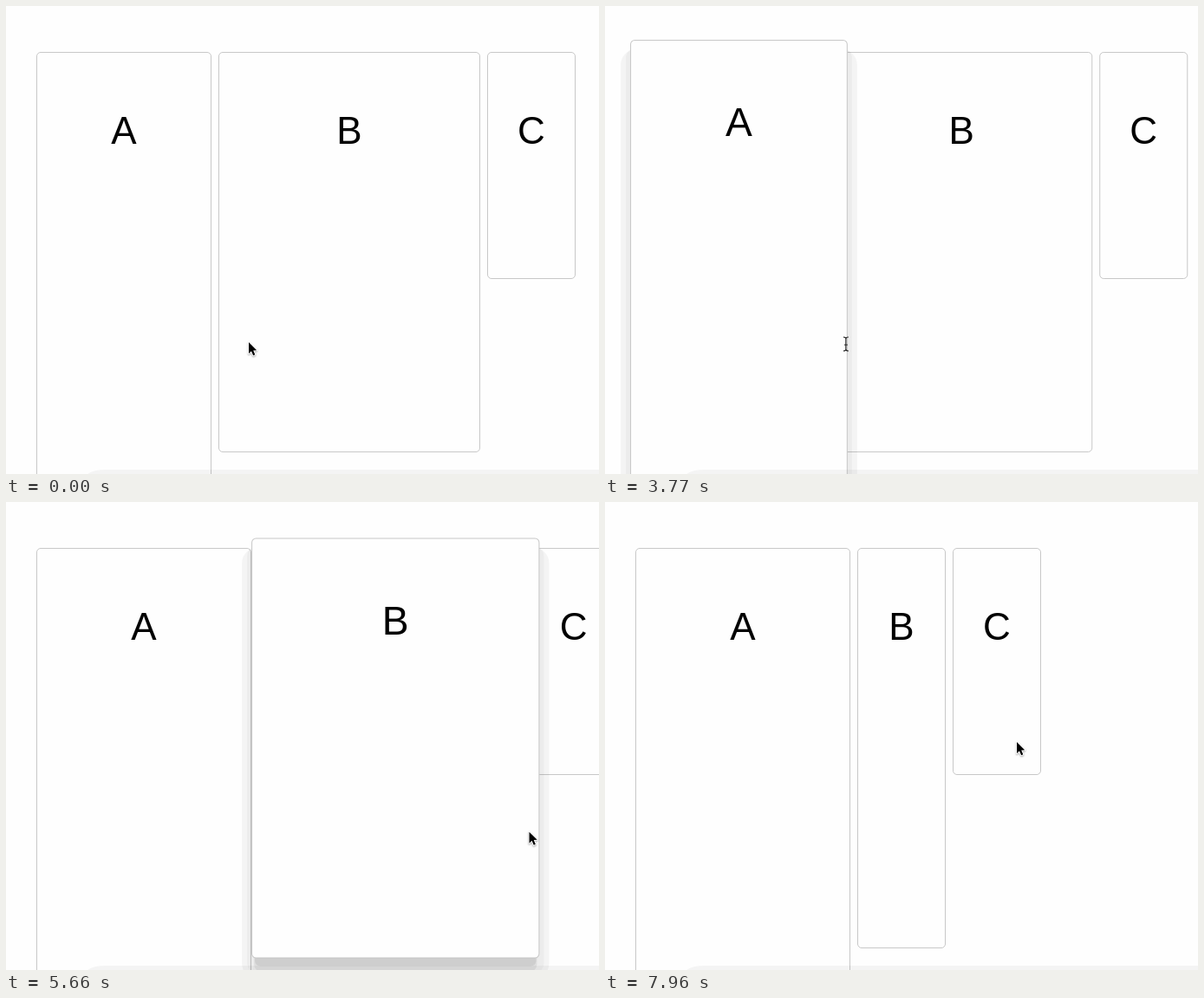
Recreate the animation shown at these times as an HTML page with a canvas. Size 684 by 540 pixels, loop 8 s.

```html
<!DOCTYPE html>
<html lang="en">
<head>
<meta charset="utf-8">
<title>Resizable panes</title>
<style>
  html, body { margin: 0; width: 684px; height: 540px; overflow: hidden; background: #fefefe; }
  canvas { display: block; }
</style>
</head>
<body>
<canvas id="stage" width="684" height="540"></canvas>
<script>
const ctx = document.getElementById('stage').getContext('2d');
const LOOP = 8000, LEFT = 35, TOP = 53, GAP = 8, LAG = 138;
const PAPER = '#fefefe';

// Each drag: pane index, lift start/end, move start/end, drop start/end, width change
const drags = [
  { pane: 0, lift: [3410, 3530], move: [3470, 3890], drop: [3980, 4330], by: 46 },
  { pane: 1, lift: [5330, 5450], move: [5450, 5770], drop: [5860, 6200], by: 20 },
  { pane: 1, lift: [7050, 7170], move: [7180, 7580], drop: [7620, 7950], by: -220 }
];

const panes = [
  { name: 'A', width: 202, height: 560 },
  { name: 'B', width: 302, height: 462 },
  { name: 'C', width: 102, height: 262 }
];

// Pointer stops: time, x, y and the shape used from then on
const stops = [
  [0, 280, 387, arrow], [50, 280, 387, arrow], [450, 241, 403, resize],
  [1540, 241, 403, arrow], [1660, 257, 390, arrow], [1900, 215, 376, arrow],
  [2030, 220, 380, arrow], [2700, 220, 380, arrow], [2750, 223, 381, arrow],
  [3130, 241, 382, resize], [3470, 241, 382, beam], [3890, 287, 392, beam],
  [4060, 287, 392, resize], [4250, 287, 392, arrow], [5000, 589, 384, resize],
  [5450, 589, 384, arrow], [5770, 609, 378, arrow], [6050, 613, 372, arrow],
  [6350, 639, 297, arrow], [6480, 653, 288, arrow], [6740, 610, 310, resize],
  [7050, 610, 310, arrow], [7180, 610, 310, arrow], [7580, 390, 298, arrow],
  [7700, 391, 296, arrow], [7950, 475, 276, arrow]
];

function ease(t, from, to) {
  const p = Math.min(1, Math.max(0, (t - from) / (to - from)));
  return p * p * (3 - 2 * p);
}

function widthOf(i, t) {
  return drags.reduce((w, d) => d.pane === i ? w + d.by * ease(t, ...d.move) : w, panes[i].width);
}

function liftOf(i, t) {
  return drags.reduce((k, d) => d.pane === i ? k + ease(t, ...d.lift) - ease(t, ...d.drop) : k, 0);
}

// Neighbours follow the dragged edge a little late
function leftOf(i, t) {
  let x = LEFT;
  for (let j = 0; j < i; j++) x += widthOf(j, t - LAG) + GAP;
  return x;
}

function box(x, y, w, h, r) {
  ctx.beginPath();
  ctx.roundRect(x, y, w, h, r);
}

function shadow(x, y, w, h, k) {
  // spread, top inset, bottom reach, radius, opacity
  const bands = [[11, 11, 24, 18, 0.04], [5, 9, 18, 12, 0.03], [-3, 20, 15, 8, 0.06], [-4, 20, 9, 6, 0.07]];
  for (const [s, top, reach, r, a] of bands) {
    ctx.fillStyle = `rgba(0,0,0,${a * k})`;
    box(x - s, y + top, w + 2 * s, h - top + reach, r);
    ctx.fill();
  }
}

function drawPane(i, t) {
  const { name, height } = panes[i];
  const w = widthOf(i, t), x = leftOf(i, t), k = liftOf(i, t);
  const scale = 1 + 0.05 * k;
  const cx = x + w / 2, cy = TOP + height / 2;
  const sw = w * scale, sh = height * scale;
  if (k > 0.001) shadow(cx - sw / 2, cy - sh / 2, sw, sh, k);

  ctx.save();
  ctx.translate(cx, cy);
  ctx.scale(scale, scale);
  ctx.translate(-cx, -cy);
  box(x + 0.5, TOP + 0.5, w - 1, height - 1, 4.5);
  ctx.fillStyle = PAPER;
  ctx.fill();
  ctx.strokeStyle = '#c8c8c8';
  ctx.lineWidth = 1;
  ctx.stroke();
  ctx.fillStyle = '#000';
  ctx.font = '44px "Liberation Sans", Arial, sans-serif';
  ctx.textAlign = 'center';
  ctx.fillText(name, cx, 159);
  ctx.restore();
}

function poly(...pts) {
  ctx.beginPath();
  for (let i = 0; i < pts.length; i += 2) ctx.lineTo(pts[i], pts[i + 1]);
  ctx.closePath();
}

function outlined() {
  ctx.save();
  ctx.shadowColor = 'rgba(0,0,0,.35)';
  ctx.shadowBlur = 2;
  ctx.shadowOffsetY = 1;
  ctx.strokeStyle = '#fff';
  ctx.lineWidth = 2;
  ctx.lineJoin = 'round';
  ctx.stroke();
  ctx.restore();
  ctx.fillStyle = '#000';
  ctx.fill();
}

function arrow() {
  poly(0, 1, 0, 14, 3, 11.2, 5.2, 16.2, 7.3, 15.3, 5.2, 10.4, 9.2, 10.2);
  outlined();
}

function resize() {
  poly(-7, 0, -3, -4, -3, -1, -1, -1, -1, -7, 1, -7, 1, -1, 3, -1, 3, -4,
    7, 0, 3, 4, 3, 1, 1, 1, 1, 7, -1, 7, -1, 1, -3, 1, -3, 4);
  outlined();
}

function beam() {
  ctx.beginPath();
  for (const s of [-1, 1]) {
    ctx.moveTo(-3, 8 * s);
    ctx.quadraticCurveTo(0, 8 * s, 0, 6 * s);
    ctx.quadraticCurveTo(0, 8 * s, 3, 8 * s);
  }
  ctx.moveTo(0, -6.5);
  ctx.lineTo(0, 6.5);
  ctx.moveTo(-2, 1);
  ctx.lineTo(2, 1);
  ctx.strokeStyle = '#222';
  ctx.lineWidth = 1.2;
  ctx.stroke();
}

function drawPointer(t) {
  let i = stops.length - 1;
  while (stops[i][0] > t) i--;
  const a = stops[i], b = stops[i + 1] || a;
  const p = a === b ? 0 : ease(t, a[0], b[0]);
  ctx.save();
  ctx.translate(a[1] + (b[1] - a[1]) * p, a[2] + (b[2] - a[2]) * p);
  a[3]();
  ctx.restore();
}

function drawStrip() {
  ctx.beginPath();
  ctx.moveTo(94, 540);
  ctx.quadraticCurveTo(101, 535, 114, 535);
  ctx.lineTo(684, 535);
  ctx.lineTo(684, 540);
  ctx.fillStyle = 'rgba(0,0,0,.038)';
  ctx.fill();
}

function draw(now) {
  const t = now % LOOP;
  ctx.fillStyle = PAPER;
  ctx.fillRect(0, 0, 684, 540);
  [0, 1, 2].sort((a, b) => liftOf(a, t) - liftOf(b, t)).forEach(i => drawPane(i, t));
  drawStrip();
  drawPointer(t);
}

let start;
function tick(now) {
  start ??= now;
  draw(now - start);
  requestAnimationFrame(tick);
}
draw(0);
requestAnimationFrame(tick);
</script>
</body>
</html>
```
